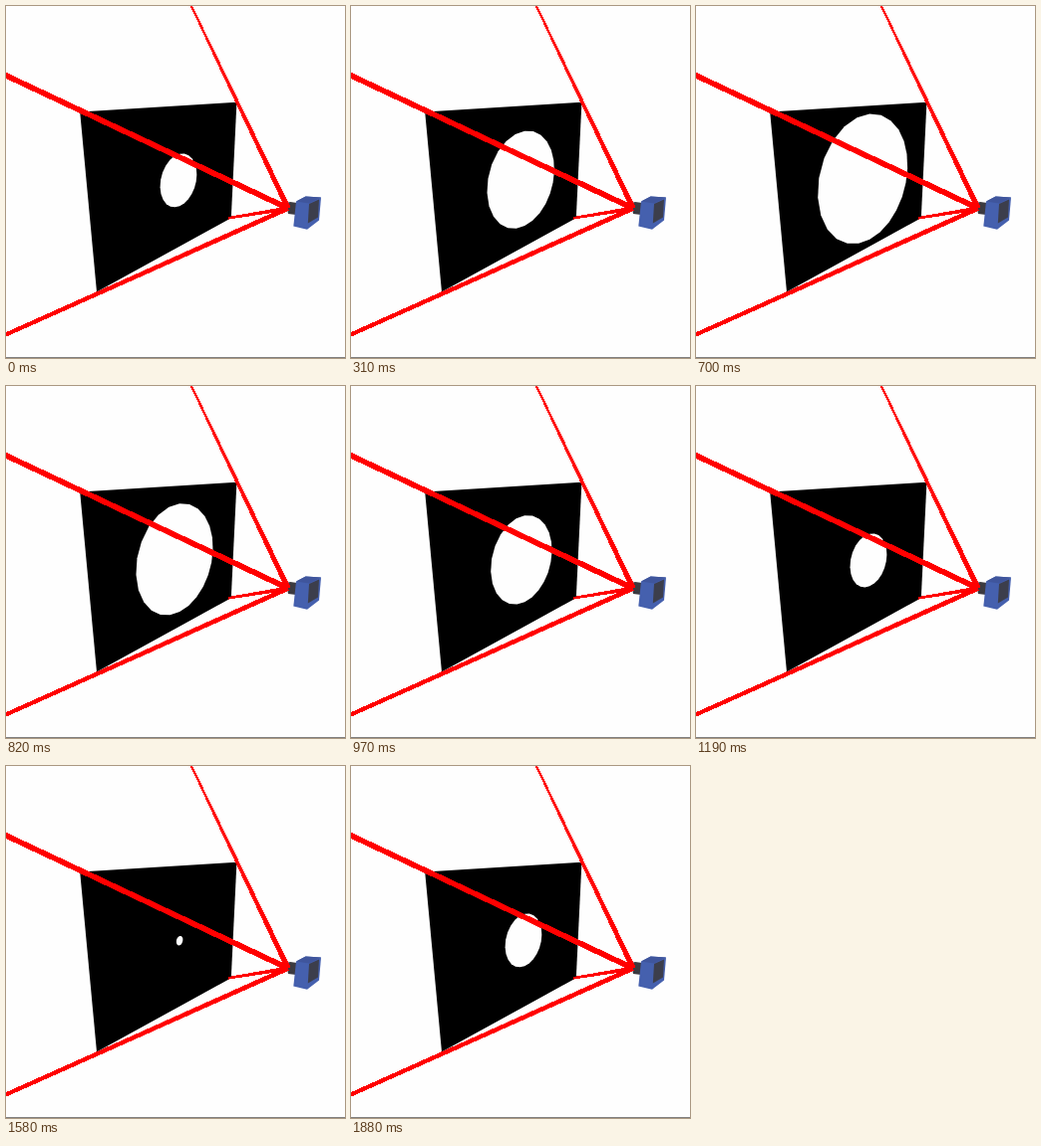
An HTML page for the animation above (1.9 s loop, 340 by 354 pixels).

```html
<!DOCTYPE html>
<html lang="en">
<head>
<meta charset="utf-8">
<title>Camera aperture</title>
<style>
  html, body { margin: 0; width: 100%; height: 100%; overflow: hidden; background: #fff; }
  svg { display: block; width: 100vw; height: 100vh; }
</style>
</head>
<body>
<svg viewBox="0 0 340 354" preserveAspectRatio="none">
  <rect width="340" height="354" fill="#fefefe"/>
  <polygon points="74.2,106.6 231.4,96.7 225.8,213.2 91,287.6" fill="#000"/>
  <polygon id="hole" fill="#fefefe"/>
  <g id="camera">
    <polygon points="281,198 285,197 292,198 291,210 283,209" fill="#3c3a40"/>
    <polygon points="291,196.5 300.5,191.5 316,192.5 314,215.5 302,224.7 288.3,221.5" fill="#4560ae"/>
    <polygon points="291,196.5 300.5,191.5 316,192.5 304,198.5" fill="#3f559c"/>
    <polygon points="304,199 314,194.5 313,212.5 302.8,218.5" fill="#3c3e4c"/>
  </g>
  <g id="rays" fill="#f00" shape-rendering="crispEdges"></g>
  <rect y="353" width="340" height="1" fill="#808080"/>
</svg>
<script>
const LOOP = 1900;
const STEP = 30;
const SIDES = 24;
const APEX = [283, 203.5];
const hole = document.getElementById('hole');
const rays = document.getElementById('rays');

// Far end, far width, width at the camera
const RAYS = [
  [-4, 68, 5.6, 5.8],
  [184.5, -3, 2, 5.4],
  [-4, 332.2, 4.2, 4.8],
  [223, 213.3, 2.6, 4.2]
];

function addRay([x, y, farWidth, nearWidth]) {
  const dx = APEX[0] - x, dy = APEX[1] - y, len = Math.hypot(dx, dy);
  const nx = -dy / len / 2, ny = dx / len / 2;
  const corner = (px, py, w) => `${px + nx * w},${py + ny * w}`;
  const ray = document.createElementNS('http://www.w3.org/2000/svg', 'polygon');
  ray.setAttribute('points', [
    corner(x, y, farWidth), corner(...APEX, nearWidth),
    corner(...APEX, -nearWidth), corner(x, y, -farWidth)
  ].join(' '));
  rays.append(ray);
}

// Perspective of the black screen, from unit square to stage
function project(u, v) {
  const w = 0.6924 * u + 0.2042 * v + 1;
  const x = (315.9 * u + 35.8 * v + 75) / w;
  const y = (57.2 * u + 239.8 * v + 107) / w;
  return `${x.toFixed(2)},${y.toFixed(2)}`;
}

// Step number and hole size: grow, shrink, grow again
const SIZES = [[0, 27], [10, 49], [20, 71.4], [32, 44.7], [39, 27.1], [50.5, 0.8], [52, 4.8], [62, 27]];

function sizeAt(step) {
  const i = Math.max(1, SIZES.findIndex(([s]) => s >= step));
  const [s0, a] = SIZES[i - 1], [s1, b] = SIZES[i];
  return a + (b - a) * (step - s0) / (s1 - s0);
}

// Two steps in the loop last slightly longer than the rest
function stepAt(t) {
  const steps = ms => Math.floor(ms / STEP);
  if (t < 310) return Math.min(steps(t), 9);
  if (t < 1130) return 10 + Math.min(steps(t - 310), 26);
  return 37 + steps(t - 1130);
}

function draw(t) {
  const rv = sizeAt(stepAt(t)) / 144.5, ru = rv * 0.728;
  const points = Array.from({ length: SIDES }, (_, i) => {
    const angle = i / SIDES * 2 * Math.PI;
    return project(0.507 + ru * Math.cos(angle), 0.497 + rv * Math.sin(angle));
  });
  hole.setAttribute('points', points.join(' '));
}

RAYS.forEach(addRay);
draw(0);
const start = performance.now();
function tick() {
  draw((performance.now() - start) % LOOP);
  requestAnimationFrame(tick);
}
requestAnimationFrame(tick);
</script>
</body>
</html>
```
